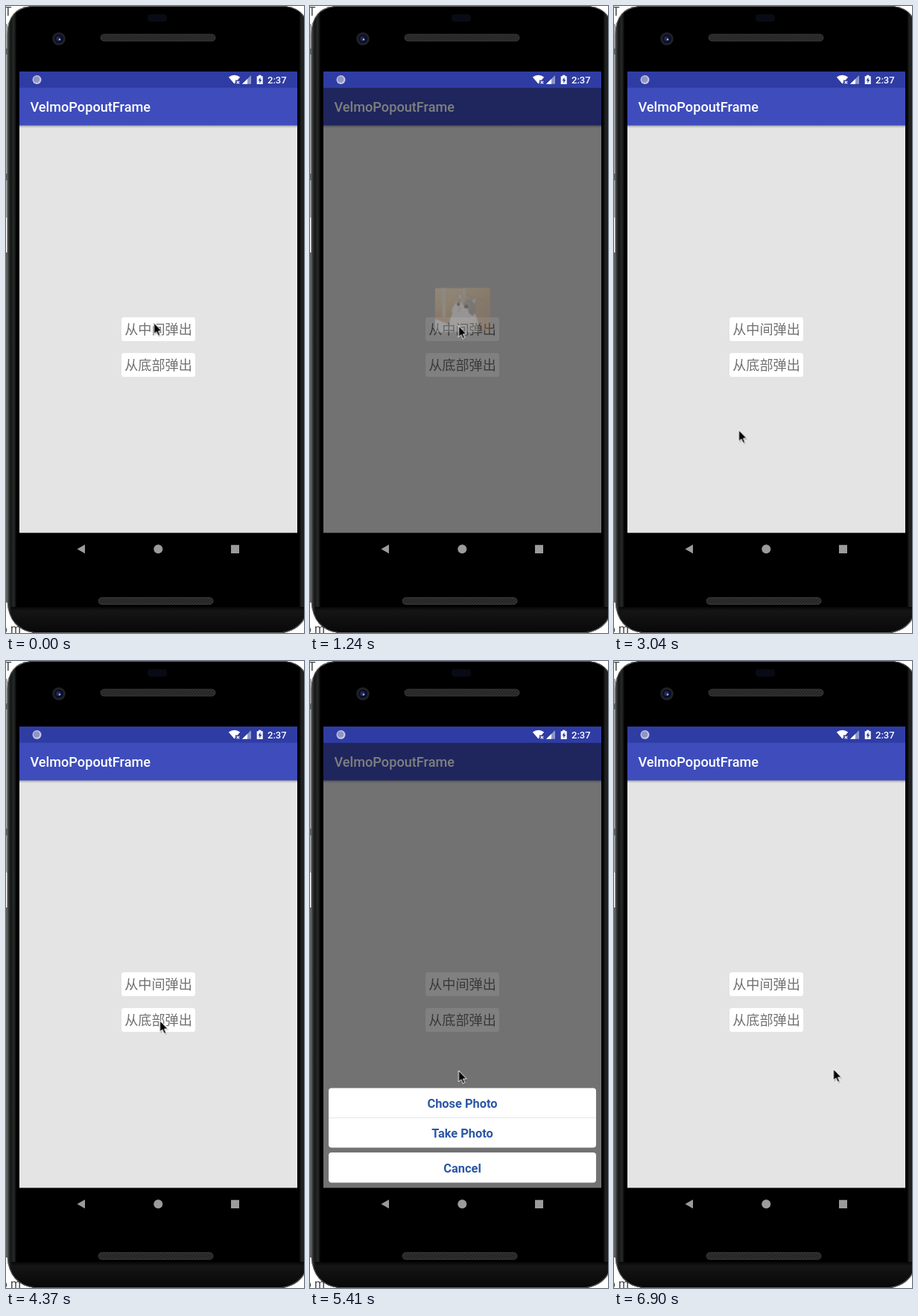
Recreate the animation shown at these times as an HTML page. Size 400 by 842 pixels, loop 8 s.

```html
<!DOCTYPE html>
<html lang="zh-CN">
<head>
<meta charset="utf-8">
<title>Popup demo</title>
<style>
html, body { margin: 0; width: 100%; height: 100%; overflow: hidden; background: #fff; }
svg { display: block; width: 100%; height: 100%; }
text { font-family: Roboto, "Noto Sans", sans-serif; }
.title { font-size: 18.15px; font-weight: 500; fill: #fff; }
.clock { font-size: 13px; font-weight: 500; fill: #fff; }
.label { font: 18.15px "Noto Sans CJK SC", "Noto Sans CJK", sans-serif; fill: #717171; text-anchor: middle; }
.item { font-size: 16.4px; font-weight: 700; fill: #2b57a7; text-anchor: middle; }
.page { font-size: 16px; fill: #444; }

#dim, #photo, #sheet, #pointer { animation: 8s step-end infinite; }
#dim { animation-name: dim; }
#photo { animation-name: photo; transform-origin: 204.5px 408.5px; }
#sheet { animation-name: sheet; }
#pointer { animation-name: pointer; }

@keyframes dim {
  0%, 36.125%, 84.375%, 100% { opacity: 0; }
  15.5%, 60.125% { opacity: .5; }
}
@keyframes photo {
  0%, 38%, 100% { opacity: 0; transform: scale(0); }
  15.5% { opacity: .26; transform: scale(.252); }
  17.375% { opacity: 1; transform: none; }
  36.125% { opacity: .4; transform: scale(.4); }
}
@keyframes sheet {
  0%, 86.25%, 100% { opacity: 0; transform: translateY(140px); }
  60.125% { opacity: 1; transform: translateY(100px); }
  62% { opacity: 1; transform: none; }
  84.375% { opacity: 1; transform: translateY(80px); }
}
@keyframes pointer {
  0%, 100% { transform: translate(198.5px, 425.5px); }
  6.25% { transform: translate(198.5px, 427.5px); }
  8% { transform: translate(199.5px, 429.5px); }
  26.75% { transform: translate(196px, 445px); }
  28.625% { transform: translate(176px, 542px); }
  30.5% { transform: translate(167.5px, 569.5px); }
  39.875% { transform: translate(170px, 563px); }
  41.75% { transform: translate(181px, 538px); }
  43.625% { transform: translate(193px, 509px); }
  45.5% { transform: translate(199px, 493px); }
  47.375% { transform: translate(201px, 488px); }
  49% { transform: translate(202px, 486.5px); }
  52.75% { transform: translate(204.5px, 484.5px); }
  54.625% { transform: translate(206.5px, 483px); }
  67.625% { transform: translate(199.5px, 550px); }
  69.5% { transform: translate(202px, 577px); }
  71.375% { transform: translate(213px, 581.5px); }
  73.25% { transform: translate(252px, 567px); }
  75.125% { transform: translate(285px, 552px); }
  76.875% { transform: translate(294.5px, 548px); }
}
</style>
</head>
<body>
<svg viewBox="0 0 400 842">
  <defs>
    <linearGradient id="side">
      <stop offset="0" stop-color="#4a4d4b"/><stop offset=".012" stop-color="#151716"/>
      <stop offset=".022" stop-color="#262927"/><stop offset=".032" stop-color="#000"/>
      <stop offset=".965" stop-color="#000"/><stop offset=".975" stop-color="#222423"/>
      <stop offset="1" stop-color="#101111"/>
    </linearGradient>
    <linearGradient id="chin" x2="0" y2="1">
      <stop offset="0" stop-color="#060606"/><stop offset=".15" stop-color="#151515"/>
      <stop offset="1" stop-color="#080808"/>
    </linearGradient>
    <linearGradient id="shade" x2="0" y2="1">
      <stop offset="0" stop-opacity=".25"/><stop offset="1" stop-opacity="0"/>
    </linearGradient>
    <linearGradient id="wall" x2=".25" y2="1">
      <stop offset="0" stop-color="#e9c48c"/><stop offset=".35" stop-color="#ddb072"/>
      <stop offset=".7" stop-color="#c08c4e"/><stop offset="1" stop-color="#b5854c"/>
    </linearGradient>
    <linearGradient id="wood" x2=".4" y2="1">
      <stop offset="0" stop-color="#dcb178"/><stop offset=".45" stop-color="#c4935a"/>
      <stop offset="1" stop-color="#ab7c49"/>
    </linearGradient>
    <linearGradient id="fur" x2="1" y2="1">
      <stop offset="0" stop-color="#c0b3a6"/><stop offset=".55" stop-color="#9a8d82"/>
      <stop offset="1" stop-color="#7c726b"/>
    </linearGradient>
    <linearGradient id="belly" x2=".6" y2="1">
      <stop offset="0" stop-color="#fff"/><stop offset=".6" stop-color="#faf6f2"/>
      <stop offset="1" stop-color="#e9e0d6"/>
    </linearGradient>
    <filter id="soft"><feGaussianBlur stdDeviation="1.3"/></filter>
    <filter id="haze" x="-.3" width="1.6"><feGaussianBlur stdDeviation="3"/></filter>
    <pattern id="mesh" width="4" height="4" patternUnits="userSpaceOnUse">
      <path fill="#242424" d="M0 0h4v4H0z"/>
      <path stroke="#343434" stroke-width=".7" d="M0 0 4 4M4 0 0 4"/>
    </pattern>
    <path id="case" d="M1.5 38Q2 3 34 0H374Q406 3 407 38V800Q404 837 370 842H38Q4 837 1.500 800Z"/>
    <clipPath id="body"><use href="#case"/></clipPath>
    <clipPath id="screen"><path d="M18 88h373v620H18z"/></clipPath>
    <clipPath id="crop"><path d="M59.5 291h290v235h-290z"/></clipPath>
  </defs>

  <!-- page behind the phone -->
  <path fill="#fff" d="M0 0h400v842H0z"/>
  <text class="page" x="-2" y="13">T</text>
  <text class="page" x="-7" y="842">6 m</text>
  <path fill="#a9adab" d="M0 24h2v260H0z"/>
  <path fill="#5c605e" d="M0 57h4v8H0zM0 225h6v9H0zM0 331h2v470H0z"/>

  <!-- phone -->
  <g clip-path="url(#body)">
    <path fill="url(#side)" d="M1.5 0H407v842H1.5z"/>
    <path fill="#000" d="M14 4h380v806H14z"/>
    <path fill="url(#chin)" d="M7 807h394v35H7z"/>
    <use href="#case" fill="none" stroke="#5e615f" stroke-width="2"/>
  </g>
  <rect x="190" y="11" width="26" height="10" rx="4" fill="#080b14"/>
  <g fill="url(#mesh)" stroke="#3b3b3b">
    <rect x="127" y="38" width="154" height="9" rx="4.5"/>
    <rect x="124" y="794.5" width="154" height="9" rx="4.5"/>
  </g>
  <circle cx="71" cy="44" r="8.8" fill="#1f2125"/>
  <circle cx="71" cy="44" r="5.8" fill="#0b0e22"/>
  <circle cx="70.5" cy="44" r="3.2" fill="#1f2a60"/>
  <circle cx="72" cy="45" r="1.3" fill="#a3aede"/>
  <g fill="#9b9b9b">
    <path d="M95.500 729.300 106 723.300v12zM302 723.700h11V735h-11z"/>
    <circle cx="204.3" cy="729.2" r="6"/>
  </g>

  <!-- app -->
  <g clip-path="url(#screen)">
    <path fill="#000" d="M18 88h373v620H18z"/>
    <path fill="#e4e4e4" d="M18 88h373v619.500H18z"/>
    <path fill="#3e4dbb" d="M18 109h373v51.500H18z"/>
    <path fill="url(#shade)" d="M18 160.500h373v3.500H18z"/>
    <text class="title" x="32.5" y="142">VelmoPopoutFrame</text>
    <g fill="#fff">
      <rect x="155" y="418" width="99" height="32" rx="3.5"/>
      <rect x="155" y="466" width="99" height="32" rx="3.5"/>
    </g>
    <text class="label" x="204.5" y="440.7">从中间弹出</text>
    <text class="label" x="204.5" y="488.7">从底部弹出</text>
    <path id="dim" opacity="0" d="M18 109.500h373V708H18z"/>

    <path fill="#2f3ca3" d="M18 88h373v21.800H18z"/>
    <circle cx="41.5" cy="99" r="6" fill="#c3c7e4"/>
    <circle cx="41" cy="98.500" r="4.300" fill="#8f96c4"/>
    <path fill="#fff" d="M298.800 95.600Q306.500 90 314.200 95.600L310.800 99.600H308V102.800L306.500 104.600Z"/>
    <path stroke="#fff" stroke-width="1.2" d="m309.600 100.800 3.600 3.600m0-3.600-3.600 3.600"/>
    <path fill="#8f97cc" d="M329 93v11.700h-12z"/>
    <path fill="#fff" d="M324 98v6.700h-7zM339 92.800h3.400v1.500h2.300v10.600h-8V94.300h2.300z"/>
    <path fill="#2f3ca3" d="m341.500 95.500-3 4.700h1.800v3.500l3-4.700h-1.800z"/>
    <text class="clock" x="351" y="104">2:37</text>

    <!-- picture popup -->
    <g id="photo" opacity="0"><g clip-path="url(#crop)">
      <path fill="url(#wall)" d="M59 291h291v236H59z"/>
      <g filter="url(#soft)">
        <path fill="url(#wood)" d="M221 285H355V532H280L250 345 222 330z"/>
        <path fill="#b5844c" d="M222 322 355 366V380L224 332z" opacity=".6"/>
        <path fill="#dfcba3" d="M93 285h20l3 154q-9 10-18 4z"/>
        <path fill="#d9c49c" d="M206 285h16l-2 58h-12z"/>
      </g>
      <path fill="#f3f3f5" d="M59 455Q105 471 142 488L205 505V526H59z"/>
      <path fill="none" stroke="#d0d3dc" d="m59 491 30-25m-29 56 60-43m-22 48 55-36M59 479l76 47M59 505l30 21M84 465l92 58"/>
      <g filter="url(#soft)">
        <path fill="#625852" d="M284 476Q314 488 314 530H284z"/>
        <path fill="url(#belly)" d="M154 424Q137 452 135 482L140 493Q172 503 193 500L198 532H291Q295 474 272 428L230 400z"/>
        <path fill="#fbf9f6" d="M133 486Q141 477 158 480Q180 484 175 496Q159 501 139 497z"/>
        <path fill="#f4eee6" d="M191 512Q197 493 222 492Q246 499 252 530H190z"/>
      </g>
      <path fill="none" stroke="#c9ae9f" d="M146 490v6m12-6v7m48 17v11m17-13v13" opacity=".8"/>
      <!-- head -->
      <g filter="url(#soft)">
        <path fill="#fdfbf8" d="M181 349Q170 374 155 389Q144 410 152 428Q180 438 200 436Q236 446 262 434L270 385 236 355z"/>
        <path fill="url(#fur)" d="M180 350Q182 324 190 315Q203 326 207 348Q228 346 244 353Q262 338 282 339Q283 364 275 382Q277 418 262 438Q243 434 235 414Q240 402 226 398Q211 394 205 368Q193 364 189 371L173 374z"/>
        <path fill="#efe3d8" d="M184 346Q186 328 190 321Q199 332 202 348z"/>
        <path fill="#e0c8ba" d="M253 357Q264 345 278 344Q277 360 269 375z"/>
        <path fill="#e2c195" d="M192 354Q210 345 222 351L211 371 195 368z"/>
        <path fill="none" stroke="#62574f" stroke-width="3" d="m231 358 18 11m-9-13 18 18m-13 19 21 6m-20 7 18 8m-20 5 14 9" opacity=".5"/>
      </g>
      <ellipse cx="183" cy="377" rx="8" ry="8.800" fill="#6c6340"/>
      <ellipse cx="183" cy="376.500" rx="6.600" ry="7.600" fill="#171615"/>
      <ellipse cx="224" cy="388.500" rx="10.500" ry="10" fill="#6c6340"/>
      <ellipse cx="224" cy="388" rx="8.800" ry="8.800" fill="#171615"/>
      <circle cx="181" cy="373" r="1.800" fill="#fff"/>
      <circle cx="221" cy="384" r="2.200" fill="#fff"/>
      <path fill="#ec9c9d" d="M183 394Q190 390 198 396L191 403z"/>
      <path fill="#d9737a" d="M178 411Q184 405 191 411Q186 415 178 411z"/>
      <path fill="none" stroke="#f7eee0" stroke-width=".8" d="M160 406Q135 385 112 388M157 410Q132 400 107 404M157 414Q130 412 110 432M160 419Q140 425 123 447"/>
      <path fill="#8d6d4a" filter="url(#haze)" d="M136 526Q165 510 190 526z" opacity=".15"/>
    </g></g>

    <!-- bottom sheet -->
    <g id="sheet" opacity="0">
      <g fill="#fff">
        <rect x="25" y="573.5" width="359" height="80" rx="4"/>
        <rect x="25" y="660" width="359" height="40.5" rx="4"/>
      </g>
      <path fill="#e6e6e6" d="M25 613h359v1H25z"/>
      <text class="item" x="204.5" y="600">Chose Photo</text>
      <text class="item" x="204.5" y="640">Take Photo</text>
      <text class="item" x="204.5" y="687">Cancel</text>
    </g>
  </g>

  <g id="pointer">
    <path opacity=".2" d="M1 2V17L4.500 14 7 19 9.500 18 7 13H12z"/>
    <path stroke="#fff" d="M0 0V15.200L3.500 12 5.900 17.500 8.400 16.400 6 11.100H10.700z"/>
  </g>
</svg>
</body>
</html>
```
